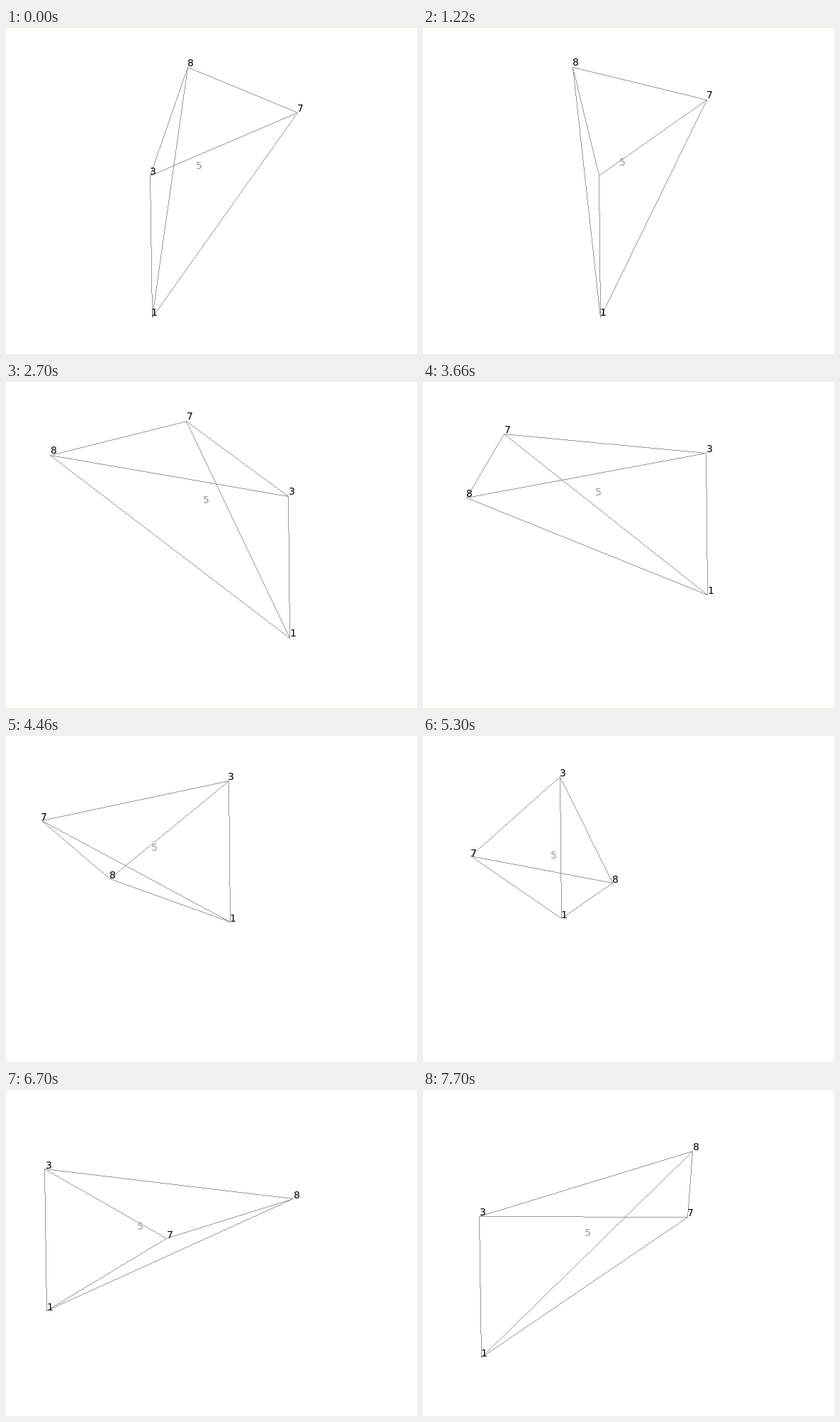
Recreate the animation shown at these times as an HTML page with a canvas. Size 580x460 px, loop 8000 ms.

```html
<!DOCTYPE html>
<html>
<head>
<meta charset="utf-8">
<title>Turning tetrahedron</title>
<style>
html, body { margin: 0; width: 100%; height: 100%; overflow: hidden; background: #fff; }
canvas { display: block; }
</style>
</head>
<body>
<canvas id="stage" width="580" height="460"></canvas>
<script>
const ctx = document.getElementById('stage').getContext('2d');
const LOOP = 8000, STEP = 40, START = 690;
const CENTER = { x: 230.2, y: 132.4 }, RX = 183.5, RY = 77;
const AXIS = { x: 2.5, y: 199.7 };
const LEAN = AXIS.x / AXIS.y;
const GREY = '#999';
const rad = deg => deg * Math.PI / 180;

// Time in ms and turn in degrees along the uneven drag.
const turn = [
  [660, 98.6], [1220, 84.6], [1460, 78.3], [2300, 45.4], [2700, 24.1],
  [3140, 4], [3660, -22.5], [3980, -40.5], [5300, -101.3], [5660, -125.2],
  [6500, -153.7], [6700, -162.4], [7340, -199.6], [7700, -214.6]
];

function slope(i) {
  const a = turn[Math.max(i - 1, 0)], b = turn[Math.min(i + 1, turn.length - 1)];
  return (b[1] - a[1]) / (b[0] - a[0]);
}

// Cubic Hermite curve through the turn points.
function angleAt(t) {
  const last = turn.length - 1;
  if (t <= turn[0][0]) return turn[0][1];
  if (t >= turn[last][0]) return turn[last][1];
  let i = 0;
  while (t >= turn[i + 1][0]) i++;
  const [t0, a0] = turn[i], [t1, a1] = turn[i + 1];
  const d = t1 - t0, s = (t - t0) / d, s2 = s * s, s3 = s2 * s;
  return a0 * (2 * s3 - 3 * s2 + 1) + a1 * (3 * s2 - 2 * s3)
    + d * (slope(i) * (s3 - 2 * s2 + s) + slope(i + 1) * (s3 - s2));
}

function onRing(deg) {
  const a = RX * Math.cos(rad(deg)), b = RY * Math.sin(rad(deg));
  return { x: CENTER.x + a + LEAN * b, y: CENTER.y + b - LEAN * a };
}

// One pixel wide line without smoothing, between whole pixels.
function line(p, q) {
  const x0 = Math.floor(p.x), y0 = Math.floor(p.y);
  const dx = Math.floor(q.x) - x0, dy = Math.floor(q.y) - y0;
  const n = Math.max(Math.abs(dx), Math.abs(dy), 1);
  for (let i = 0; i <= n; i++) {
    ctx.fillRect(Math.round(x0 + dx * i / n), Math.round(y0 + dy * i / n), 1, 1);
  }
}

function label(text, p, dx, dy) {
  ctx.fillText(text, Math.floor(p.x + dx - 4), Math.floor(p.y + dy + 5));
}

function draw(t) {
  const tick = t < START ? 0 : Math.floor((t - 20) / STEP) * STEP + 20;
  const deg = angleAt(tick);
  const p3 = onRing(deg), p7 = onRing(deg - 106.2), p8 = onRing(deg - 180);
  const p1 = { x: p3.x + AXIS.x, y: p3.y + AXIS.y };
  const points = [p1, p3, p7, p8];
  const middle = {
    x: points.reduce((sum, p) => sum + p.x, 0) / 4,
    y: points.reduce((sum, p) => sum + p.y, 0) / 4
  };

  ctx.fillStyle = '#fff';
  ctx.fillRect(0, 0, 580, 460);

  ctx.fillStyle = GREY;
  points.forEach((p, i) => points.slice(i + 1).forEach(q => line(p, q)));

  ctx.font = '14px "DejaVu Sans", sans-serif';
  label('5', middle, 3.2, -4.2);

  ctx.fillStyle = '#000';
  const dx = 4.5 + 0.8 * Math.cos(rad(2 * (deg - 15)));
  const dy = -5.8 - 1.4 * Math.cos(rad(deg - 55));
  const covered = deg > 53 && deg < 90;
  label('1', p1, dx, dy);
  if (!covered) label('3', p3, dx, dy);
  label('7', p7, dx, dy);
  label('8', p8, dx, dy);
}

const begin = performance.now();
function frame() {
  draw((performance.now() - begin) % LOOP);
  requestAnimationFrame(frame);
}
frame();
</script>
</body>
</html>
```
